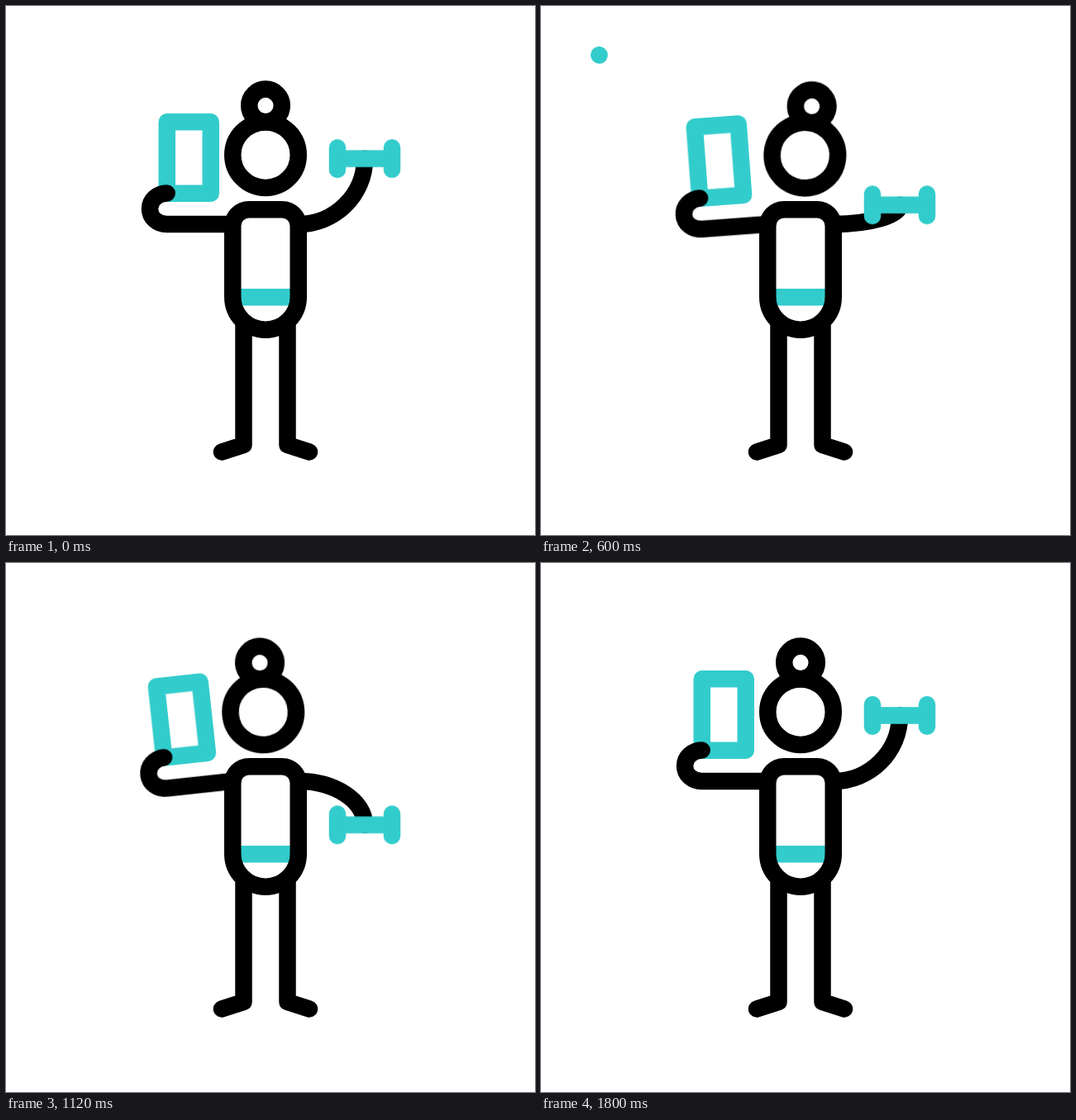
Write an HTML page that moves like this. It is 640x640 px and loops after 2400 ms.

```html
<!DOCTYPE html>
<html lang="en">
<head>
<meta charset="utf-8">
<title>Workout selfie</title>
<style>
  html, body { margin: 0; width: 100%; height: 100%; overflow: hidden; background: #fff; }
  svg {
    display: block; width: 100vw; height: 100vh;
    fill: none; stroke: #000; stroke-width: 20.5;
    stroke-linecap: round; stroke-linejoin: round;
    --ease: cubic-bezier(.333, 0, .667, 1);
    --lower: cubic-bezier(.333, 0, .667, .98);
    --lift: cubic-bezier(.333, .04, .667, .96);
  }
  .teal { stroke: #3cc; }
  .move, .ray { animation: 2400ms var(--ease) infinite; }

  .head { transform-origin: 314px 219px; animation-name: head; }
  .selfie { transform-origin: 274px 264px; animation-name: selfie; }
  .weight { animation-name: weight; }
  .arm { animation-name: arm; }

  @keyframes head {
    0%, 55.83%, 100% { transform: rotate(0deg); }
    17.5% { transform: rotate(17.3deg); }
    36.25% { transform: rotate(-9deg); }
  }
  @keyframes selfie {
    0%, 75%, 100% { transform: rotate(0deg); }
    16.25% { transform: rotate(-16.5deg); }
    35% { transform: rotate(10.5deg); }
    51.25% { transform: rotate(-10.1deg); }
  }
  @keyframes weight {
    0%, 37.5%, 75%, 100% { transform: translateY(0); animation-timing-function: var(--lower); }
    17.5%, 55% { transform: translateY(160px); animation-timing-function: var(--lift); }
  }
  @keyframes arm {
    0%, 37.5%, 75%, 100% {
      d: path("M354 264C398 264 434 228.5 434 184.5");
      animation-timing-function: var(--lower);
    }
    17.5%, 55% {
      d: path("M354 264C398 264 434 300 434 344.5");
      animation-timing-function: var(--lift);
    }
  }

  /* Each ray grows outward, then its inner end catches up. */
  .ray { stroke-dasharray: 1 3; stroke-dashoffset: 1.01; }
  .r1 { animation-name: ray1; }
  .r2 { animation-name: ray2; }
  .r3 { animation-name: ray3; }
  .r4 { animation-name: ray4; }
  @keyframes ray1 {
    0%, 6.25% { stroke-dashoffset: 1.01; }
    14.375% { stroke-dashoffset: 0; }
    22.29%, 100% { stroke-dashoffset: -1.01; }
  }
  @keyframes ray2 {
    0%, 6.7% { stroke-dashoffset: 1.01; }
    16.25% { stroke-dashoffset: 0; }
    25.75%, 100% { stroke-dashoffset: -1.01; }
  }
  @keyframes ray3 {
    0%, 5.42% { stroke-dashoffset: 1.01; }
    13.96% { stroke-dashoffset: 0; }
    22.08%, 100% { stroke-dashoffset: -1.01; }
  }
  @keyframes ray4 {
    0% { stroke-dashoffset: 1.01; }
    8.25% { stroke-dashoffset: 0; }
    16.5%, 100% { stroke-dashoffset: -1.01; }
  }
</style>
</head>
<body>
<svg viewBox="0 0 640 640">
  <g class="teal">
    <path class="ray r1" pathLength="1" d="M182 84L144 31"/>
    <path class="ray r2" pathLength="1" d="M135 111.5L70.2 59.2"/>
    <path class="ray r3" pathLength="1" d="M110.5 239L30.5 263"/>
    <path class="ray r4" pathLength="1" d="M143.4 282L88.7 316.5"/>
  </g>

  <g class="move head">
    <circle cx="314" cy="120.4" r="19.8"/>
    <circle cx="314" cy="180.2" r="39.75"/>
  </g>

  <path d="M287.5 382V531L261 539.5M340.5 382V531L367 539.5"/>
  <path class="teal" stroke-linecap="butt" d="M275 352.2H353"/>
  <path d="M294 246.2H334A19.75 19.75 0 0 1 353.75 266V352A39.75 39.75 0 0 1 274.25 352V266A19.75 19.75 0 0 1 294 246.2Z"/>

  <g class="move selfie">
    <rect class="teal" x="194.75" y="140.25" width="53" height="86.5"/>
    <path d="M274 264H194.5C183 264 174 256 174 245.5S183 226.7 194.7 226.5"/>
  </g>

  <path class="move arm" d="M354 264C398 264 434 228.5 434 184.5"/>
  <path class="move weight teal" d="M401 184.5H467M401 171.3V197.7M467 171.3V197.7"/>
</svg>
</body>
</html>
```
